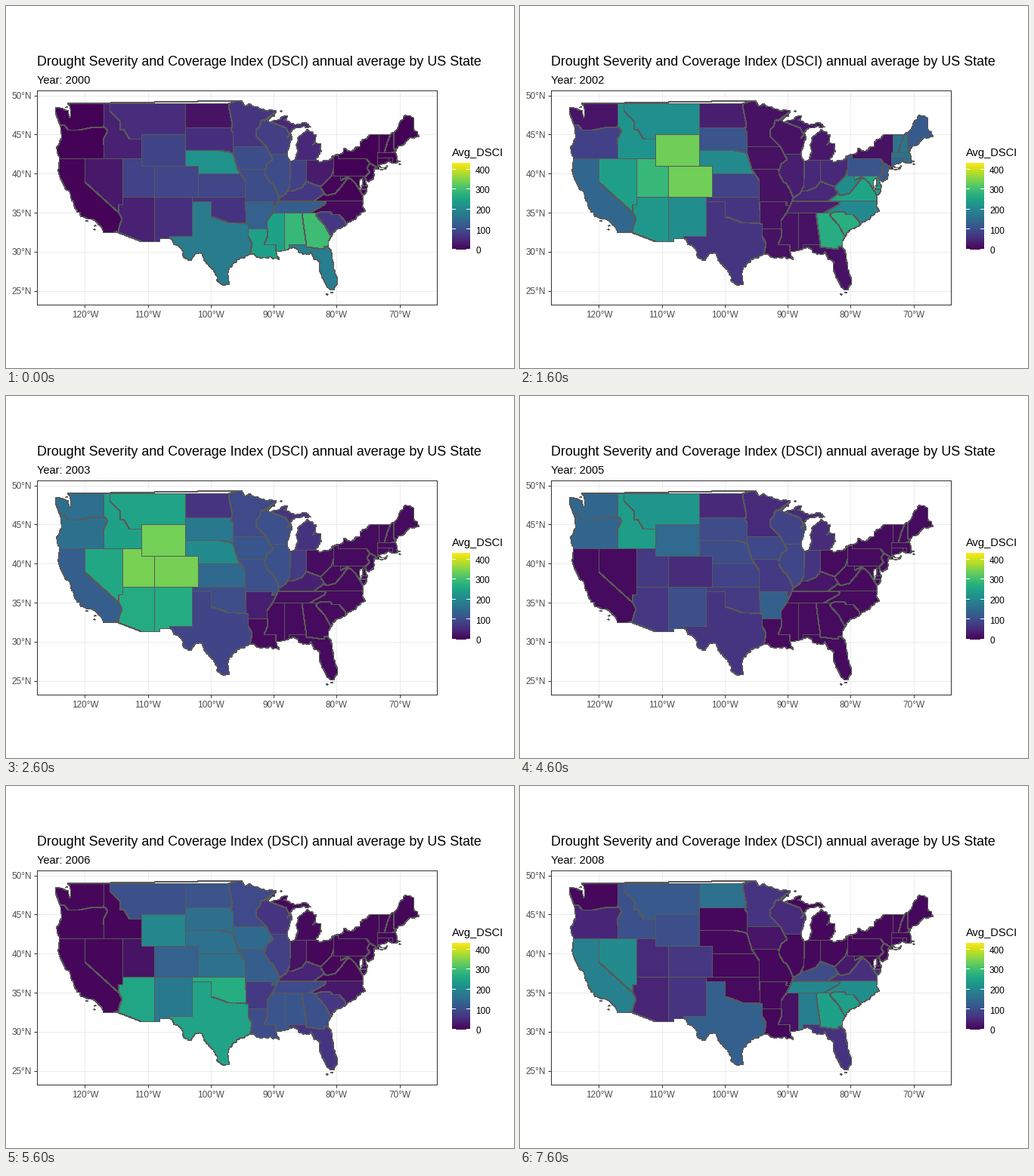
A matplotlib script that plays this animation: 672x480 px, repeating every 8000 ms.

```python
import numpy as np
import matplotlib.pyplot as plt
from matplotlib.animation import FuncAnimation
from matplotlib.collections import PolyCollection
from matplotlib.patches import PathPatch, Rectangle
from matplotlib.path import Path

W, H, DPI = 672, 480, 96
PX = 72 / DPI
TOP_VALUE = 432
STEP_MS, LOOP_MS = 200, 8000
LEFT, RIGHT, TOP, BOTTOM = 41, 570, 112, 396

plt.rcParams["font.family"] = "Liberation Sans"
rng = np.random.default_rng(7)


def line(*v):
    """Pairs of degrees west and degrees north."""
    return np.array(v, float).reshape(-1, 2)


def coast(*v):
    """The same, roughened by midpoint displacement."""
    p = line(*v)
    for _ in range(3):
        d = np.diff(p, axis=0)
        shift = rng.uniform(-0.17, 0.17, (len(d), 1))
        out = np.empty((2 * len(p) - 1, 2))
        out[::2] = p
        out[1::2] = (p[:-1] + p[1:]) / 2 + d[:, ::-1] * [1, -1] * shift
        p = out
    return p


def box(west, east, south, north):
    return line(west, south, west, north, east, north, east, south)


def isle(x, y, w=0.18, h=0.07):
    return coast(x + w, y, x, y + h, x - w, y, x, y - h, x + w, y)


pacific = coast(122.76, 49, 122.3, 48, 122.5, 47.2, 122.75, 48.1, 124.7, 48.38,
                124, 46.3, 124.1, 44, 124.55, 42.84, 124.1, 41, 124.4, 40.4,
                123.8, 39.2, 122.5, 37.7, 121.9, 36.4, 120.6, 34.55,
                118.5, 34.03, 117.3, 33, 117.12, 32.53)
desert = line(114.82, 32.5, 111.07, 31.33, 108.2, 31.33, 108.2, 31.78,
              106.5, 31.78)
rio = coast(106.5, 31.78, 104.9, 30.6, 104.5, 29.65, 103.2, 28.98, 102.5, 29.8,
            101.4, 29.77, 100.3, 28.3, 99.5, 27.5, 99.1, 26.4, 97.15, 25.9)
gulf = coast(97.15, 25.9, 97.4, 27.2, 96.8, 28.2, 94.7, 29.35, 93.2, 29.78,
             91.3, 29.3, 90.1, 29.15, 89.2, 29.05, 89.6, 30.1, 88, 30.3,
             86.3, 30.38, 85.3, 29.7, 84.2, 30.05, 82.7, 28.7, 82.75, 27.8,
             81.8, 26, 81.1, 25.13, 80.4, 25.2, 80.03, 26.8, 80.55, 28.4,
             81.45, 30.72)
atlantic = coast(81.45, 30.72, 80.9, 32.03, 79.2, 33.2, 77.95, 33.87,
                 76.6, 34.68, 75.5, 35.25, 75.9, 36.55, 76.4, 38, 76.4, 39.2,
                 76, 39.4, 76.1, 38.3, 75.95, 37.15, 75.1, 38.5, 75.5, 39.5,
                 74.9, 38.95, 74.1, 39.75, 74.1, 40.6, 72.9, 41.25,
                 71.4, 41.45, 70, 41.65, 70.5, 41.85, 70.7, 42.7, 70.2, 43.6,
                 68.8, 44.4, 66.97, 44.8, 67.79, 45.7)
northeast = coast(67.79, 47.07, 68.3, 47.35, 69.23, 47.46, 70, 46.7,
                  70.4, 45.8, 71.1, 45.3)
lakes = coast(74.7, 45, 76.3, 44.1, 76.3, 43.5, 79, 43.27, 78.9, 42.85,
              81.2, 41.8, 82.7, 41.5, 83.45, 41.73, 82.5, 42.9, 82.6, 43.9,
              83.3, 44, 83.9, 43.7, 83.3, 44.9, 84.75, 45.75, 85.5, 45.1,
              86.3, 44.6, 86.5, 43.65, 86.2, 42.8, 86.8, 41.76, 87.5, 41.68,
              87.9, 43, 87.2, 45.1, 88, 44.55, 87, 45.75, 85.5, 46.08,
              84.1, 46, 84.8, 46.45, 87.4, 46.5, 88.4, 46.85, 87.8, 47.45,
              89.1, 47, 90.5, 46.6, 91, 46.9, 92.1, 46.75, 89.6, 48,
              91.4, 48.1, 93, 48.6, 94.7, 48.75)
mainland = np.vstack([pacific, desert, rio, gulf, atlantic, northeast,
                      line(71.5, 45.01), lakes,
                      line(95.15, 49.38, 95.15, 49)])
long_island = coast(74, 40.6, 73.6, 40.88, 72, 41.05, 73.5, 40.58, 74, 40.6)
islands = [isle(*p) for p in (
    (119.75, 34), (118.45, 33.38), (118.5, 32.9), (122.95, 48.55),
    (88.85, 48.03), (80.85, 24.85), (81.6, 24.6), (70.65, 41.4), (70.05, 41.28))]
land = [mainland, long_island, *islands]

# Rough state shapes: each covers its earlier neighbours, and land clips all.
states = [
    # West
    box(125, 117.04, 45.4, 49),  # Washington
    box(116.05, 104.05, 44.4, 49),  # Montana
    line(117.04, 49, 116.05, 49, 116.05, 48, 114.4, 46.65, 114.5, 45.57,
         113.95, 45.7, 113, 44.45, 111.05, 44.5, 111.05, 42, 117.03, 42,
         117.25, 44.2, 117.04, 46.2),  # Idaho
    line(125, 46.25, 123.3, 46.2, 122.7, 45.6, 121, 45.65, 119.2, 45.95,
         116.9, 46, 116.5, 45.5, 117.2, 44.4, 117.03, 43.8, 117.03, 42,
         125, 42),  # Oregon
    box(114.04, 109.05, 37, 42),  # Utah
    box(111.05, 104.05, 41, 45),  # Wyoming
    box(115, 109.05, 31, 37),  # Arizona
    line(120, 42, 114.04, 42, 114.04, 36.1, 114.75, 36.1, 114.6, 34.8,
         120, 38.8),  # Nevada
    line(125, 42, 120, 42, 120, 39, 114.63, 35, 114.2, 34.2, 114.55, 33.5,
         114.72, 32.72, 117.1, 32, 125, 32.5),  # California
    # Plains
    box(109.05, 103.04, 31, 37),  # New Mexico
    line(106.6, 31, 106.6, 32, 103.04, 32, 103.04, 36.5, 99.9, 36.5,
         99.9, 34.8, 94.04, 33.8, 94.04, 32, 93.55, 31.2, 93.7, 29.5,
         97, 25, 103, 28),  # Texas
    box(104.05, 96.5, 45.94, 49),  # North Dakota
    box(104.05, 96.4, 42.5, 45.94),  # South Dakota
    line(104.05, 40, 104.05, 43, 98.5, 43, 97.2, 42.85, 96.3, 42.5,
         95.3, 40),  # Nebraska
    box(109.05, 102.05, 37, 41),  # Colorado
    box(102.05, 94.62, 37, 40),  # Kansas
    line(103.04, 37, 94.62, 37, 94.45, 35.4, 94.48, 33.64, 96, 33.75,
         97.2, 33.8, 99.2, 34.3, 100, 34.56, 100, 36.5, 103.04, 36.5),  # Oklahoma
    # Atlantic
    box(79.8, 73.35, 40.5, 45.1),  # New York
    box(73.5, 69.8, 41.2, 42.73),  # Massachusetts
    box(73.5, 71.8, 41.1, 42.03),  # Connecticut
    box(71.8, 71.12, 41.3, 42.02),  # Rhode Island
    box(73.35, 71.5, 42.73, 45.02),  # Vermont
    line(72.46, 42.73, 72.05, 44.1, 71.5, 45.01, 71.08, 45.4, 70.9, 43.2,
         70.5, 42.9, 71.3, 42.7),  # New Hampshire
    line(71.08, 45.5, 70.95, 43.3, 70.5, 43, 66.5, 44, 67, 48, 70.5, 48),  # Maine
    box(79.48, 75, 37.9, 39.72),  # Maryland
    box(75.79, 75, 38.46, 39.85),  # Delaware
    line(80.52, 42.3, 79.76, 42.3, 79.76, 42, 75.35, 42, 74.7, 41.36,
         74.5, 40.5, 75.5, 39.72, 80.52, 39.72),  # Pennsylvania
    line(74.7, 41.36, 73.9, 41, 73.5, 40, 75, 38.8, 75.55, 39.5,
         74.75, 40.2, 75.2, 40.7, 75.05, 41.1),  # New Jersey
    # South
    box(89.4, 82, 36.5, 39.15),  # Kentucky
    line(83.68, 36.55, 82, 37.55, 79.5, 38.7, 78.2, 39.4, 77.72, 39.32,
         77.05, 38.8, 76.5, 38.1, 75, 38, 75, 36.5),  # Virginia
    line(80.52, 40.64, 80.52, 39.72, 79.48, 39.72, 79.48, 39.2, 78.4, 39.62,
         77.72, 39.32, 78.35, 39.4, 79.3, 38.42, 80.3, 37.55, 81.68, 37.2,
         82.6, 38.17, 82.6, 38.6, 81.9, 39.3, 80.8, 40.6),  # West Virginia
    box(84.3, 75.2, 33.5, 36.55),  # North Carolina
    line(83.1, 35, 82.3, 35.2, 81.05, 35.15, 80.8, 34.82, 79.67, 34.8,
         78.55, 33.86, 79, 32, 81.5, 32, 83.4, 34.6),  # South Carolina
    box(91.7, 88, 30, 35),  # Mississippi
    box(88.35, 85, 30, 35),  # Alabama
    line(85.6, 35, 83.1, 35, 83.35, 34.7, 81.95, 33.45, 81.15, 32.2, 80.5, 32,
         81, 30.7, 82, 30.75, 82.1, 30.4, 84.86, 30.7, 85, 31.5,
         85.18, 32.87),  # Georgia
    line(87.6, 31, 85, 31, 84.86, 30.7, 82.1, 30.4, 82, 30.75, 81, 30.7,
         79.5, 27, 80, 24.3, 82.5, 24.3, 83, 28, 87.6, 29.5),  # Florida
    line(89.6, 36.5, 81.7, 36.58, 82, 36.1, 84.32, 35, 90.4, 35,
         89.7, 36),  # Tennessee
    # Great Lakes and Mississippi valley
    box(90.5, 82, 41.73, 48.2),  # Michigan
    line(84.82, 41.73, 83.4, 41.73, 80.52, 42.2, 80.52, 40.64, 80.85, 39.7,
         81.8, 38.95, 82.6, 38.42, 83.7, 38.65, 84.82, 39.1),  # Ohio
    line(88, 41.75, 84.82, 41.75, 84.82, 39.1, 85.6, 38.3, 87.1, 37.85,
         88.1, 37.85),  # Indiana
    line(97.23, 49, 97.1, 48.2, 96.6, 46.3, 96.85, 45.6, 96.45, 45.3,
         96.45, 43.5, 91.22, 43.5, 92, 45, 92, 46.6, 89.4, 48.1,
         95.15, 49.5),  # Minnesota
    line(92.29, 46.1, 92.1, 46.8, 90.4, 47.1, 90.4, 46.55, 88.1, 45.9,
         87.6, 45.1, 86.8, 45.3, 87.4, 42.5, 90.64, 42.5, 91.22, 43.5,
         92.75, 44.75, 92.85, 45.6),  # Wisconsin
    line(90.8, 42.5, 87.4, 42.5, 87.53, 39.4, 87.5, 38.5, 88.1, 37.5,
         89.15, 36.98, 89.4, 37.1, 90.6, 38.5, 91.8, 40.2, 90.9, 41.9),  # Illinois
    line(96.45, 43.5, 96.45, 42.5, 95.85, 41, 95.77, 40.59, 91.73, 40.6,
         91.42, 40.38, 91.05, 41.3, 90.15, 41.9, 90.64, 42.5,
         91.22, 43.5),  # Iowa
    line(94.62, 36.5, 90, 36.5, 89.7, 36, 90.3, 35, 91.1, 34, 91.15, 33,
         94.04, 33, 94.04, 33.55, 94.48, 33.64, 94.43, 35.4),  # Arkansas
    line(95.77, 40.59, 95.3, 40, 94.61, 39.11, 94.62, 36.5, 90.15, 36.5,
         90.37, 36, 89.7, 36, 89.15, 36.98, 89.7, 37.9, 90.2, 38.8,
         90.7, 38.95, 91.5, 40, 91.42, 40.38, 91.73, 40.6),  # Missouri
    line(94.04, 33, 91.15, 33, 91, 32.2, 91.6, 31, 89.73, 31, 89.6, 30.1,
         88.8, 29.5, 89, 28.5, 94, 29, 93.7, 30.1, 93.55, 31.2,
         94.04, 32),  # Louisiana
]
centres = np.array([(s.min(0) + s.max(0)) / 2 for s in states])


def drought(floor, *spots):
    """Strongest of some flat-topped spots: west, north, peak, radius."""
    out = np.full(len(states), float(floor))
    for west, north, peak, radius in spots:
        d = np.hypot(0.8 * (centres[:, 0] - west), centres[:, 1] - north)
        out = np.maximum(out, peak * np.exp(-(d / radius) ** 4))
    return out


# One row per year, from 2000 on
values = [
    drought(3, (84.8, 32.5, 330, 2.5), (88, 30.5, 255, 6), (100, 31, 180, 4),
            (99.7, 41.5, 220, 2.5), (93, 40, 100, 8), (107, 40.5, 90, 8)),
    drought(30, (116, 46, 250, 7), (82.5, 30.5, 230, 4.5), (118, 38, 110, 5),
            (90, 33, 100, 5), (84, 37, 85, 6)),
    drought(20, (106.5, 41, 390, 3.5), (110, 40, 290, 9), (77.5, 37.2, 260, 4),
            (82, 33.2, 285, 2), (99.7, 41.5, 205, 3), (71, 43.5, 170, 3.5),
            (99, 33, 70, 5), (84, 40, 50, 6)),
    drought(12, (109, 40, 345, 9), (121, 45.5, 160, 4), (93, 42, 115, 7),
            (99, 33, 100, 4)),
    drought(8, (109.5, 41, 365, 4), (109, 34, 315, 4), (117, 38.5, 295, 2),
            (111, 46.5, 285, 3.5), (100, 43, 165, 6), (119.5, 37, 90, 2),
            (95, 42, 45, 6), (98.5, 33, 40, 4), (121, 45.5, 50, 3)),
    drought(12, (112.5, 45, 240, 5.3), (121, 45.7, 150, 3), (100, 42, 100, 6),
            (108, 34, 105, 4), (98, 33, 85, 4), (91, 42, 95, 5.5),
            (92.4, 34.8, 130, 2)),
    drought(8, (97.5, 35.3, 285, 2), (100, 31, 250, 3.5), (112, 34, 255, 3),
            (107.5, 43, 200, 2.5), (99, 41, 160, 8.5), (106, 34.4, 175, 2),
            (110, 47, 105, 2), (87, 32, 115, 6)),
    drought(8, (85.5, 33.5, 320, 4.5), (82.5, 28, 250, 2.5), (115, 37.5, 220, 6),
            (110.5, 44, 195, 5), (95, 45.5, 140, 5), (79, 38, 125, 3.5),
            (97, 35, 60, 6)),
    drought(10, (117.5, 38, 205, 3.5), (83, 34, 245, 4.5), (100, 31, 130, 3.5),
            (100.5, 47.5, 160, 2.5), (110.5, 45, 120, 5), (107, 37, 70, 6),
            (93, 46, 65, 4), (82, 28, 65, 3), (121, 44, 45, 2)),
]

fig = plt.figure(figsize=(W / DPI, H / DPI), dpi=DPI, facecolor="white")

# Map panel
ax = fig.add_axes([LEFT / W, 1 - BOTTOM / H, (RIGHT - LEFT) / W,
                   (BOTTOM - TOP) / H])
ax.set_xlim(127.62, 64.06)
ax.set_ylim(23.25, 50.63)
lons, lats = range(120, 60, -10), range(25, 55, 5)
ax.set_xticks(lons, [f"{d}°W" for d in lons])
ax.set_yticks(lats, [f"{d}°N" for d in lats])
ax.tick_params(length=3.67 * PX, width=PX, color="#333333",
               labelcolor="#4D4D4D", labelsize=8.8)
ax.tick_params(axis="x", pad=4.4 * PX)
ax.tick_params(axis="y", pad=3 * PX)
ax.grid(color="#EBEBEB", linewidth=PX)
ax.set_axisbelow(True)
for spine in ax.spines.values():
    spine.set(color="#333333", linewidth=PX)

border = dict(linewidth=PX, edgecolor="#595959", antialiased=False, snap=True)
shore = Path.make_compound_path(*[Path(p, closed=True) for p in land])
fills = PolyCollection(states, cmap="viridis", zorder=2, **border)
fills.set_clim(0, TOP_VALUE)
ax.add_collection(fills, autolim=False)
fills.set_clip_path(shore, ax.transData)
ax.add_patch(PathPatch(shore, facecolor="none", zorder=2.1, **border))

# Titles and colour bar in pixel coordinates
page = fig.add_axes([0, 0, 1, 1])
page.axis("off")


def text(x, y, s, size, va="baseline"):
    return page.text(x, y, s, fontsize=size, va=va, color="black")


text(41, 79, "Drought Severity and Coverage Index (DSCI) annual average"
     " by US State", 13.38)
subtitle = text(41, 103, "", 11)
text(590, 199.5, "Avg_DSCI", 11)
page.imshow(np.linspace(1, 0, 256)[:, None], cmap="viridis", aspect="auto",
            extent=(590, 614, 323, 208), interpolation="bilinear")
page.set(xlim=(0, W), ylim=(H, 0))
for v in range(0, 500, 100):
    y = 323 - v * 115 / TOP_VALUE
    for x in (590, 609):
        page.add_patch(Rectangle((x, round(y) - 1), 5, 1, fc="white", lw=0))
    text(621, y + 0.8, str(v), 8.8, va="center_baseline")


def draw(i):
    year = (i * STEP_MS + 400) // 1000
    fills.set_array(values[year])
    subtitle.set_text(f"Year: {2000 + year}")
    return fills, subtitle


anim = FuncAnimation(fig, draw, frames=LOOP_MS // STEP_MS, interval=STEP_MS,
                     repeat=True, repeat_delay=0, blit=False)
plt.show()
```
